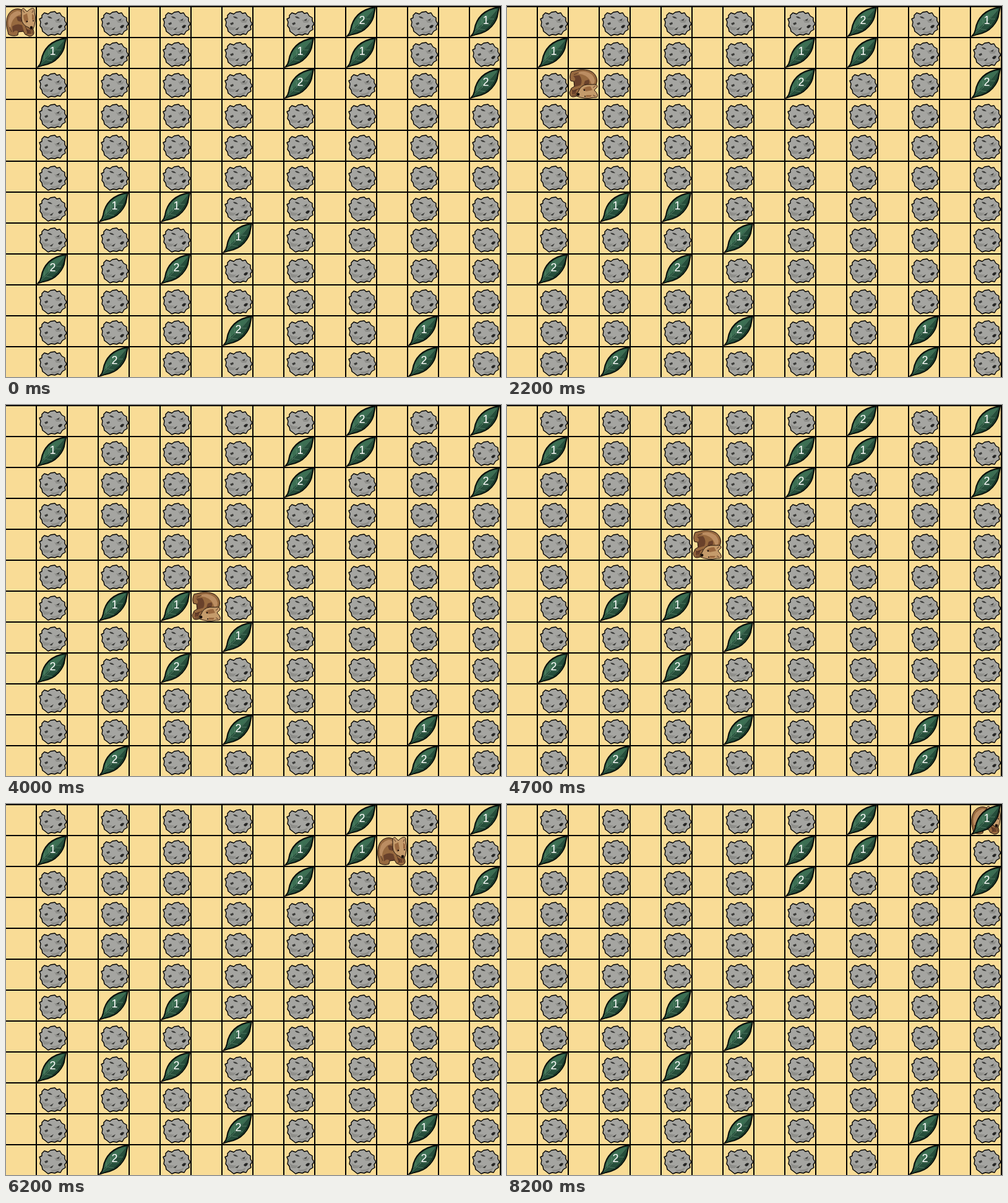
An HTML page with a canvas for the animation above (9500 ms loop, 800x600 px).

```html
<!DOCTYPE html>
<html lang="en">
<head>
<meta charset="utf-8">
<title>Wombat maze</title>
<style>
  html, body { margin: 0; width: 100%; height: 100%; overflow: hidden; background: #f9dc96; }
  canvas { display: block; }
</style>
</head>
<body>
<canvas id="stage" width="800" height="600"></canvas>
<script>
const CELL = 50, COLS = 16, ROWS = 12;
const LOOP = 9500, START = 1600, TICK = 100;
const ctx = document.getElementById('stage').getContext('2d');
ctx.lineJoin = 'round';

// Row of the "1" and "2" leaf in each wall column
const ONES = [1, 6, 6, 7, 1, 1, 10, 0];
const TWOS = [8, 11, 8, 10, 2, 0, 11, 2];

// Pace of the walk: [tick, acts done by then]
const PACE = [[0, 0], [7, 19], [16, 53], [25, 87], [39, 139], [40, 143], [50, 172], [56, 194], [67, 235]];

// Search each corridor from the top for the "1" leaf; the wombat only turns right.
function planWalk() {
  let x = 0, y = 0, dir = 0;
  const acts = [{ x, y, dir }];
  const save = () => acts.push({ x, y, dir });
  const turn = n => { while (n--) { dir = (dir + 1) % 4; save(); } };
  const move = () => {
    x += [1, 0, -1, 0][dir];
    y += [0, 1, 0, -1][dir];
    save();
  };
  ONES.forEach((row, i) => {
    if (i) {
      turn(3);
      while (y > 0) move();
      turn(1);
    }
    while (y < row) { turn(1); move(); turn(3); }
    move();
    if (i < ONES.length - 1) move();
  });
  return acts;
}
const acts = planWalk();

function actAt(tick) {
  const i = Math.max(1, PACE.findIndex(p => p[0] >= tick));
  const [t0, a0] = PACE[i - 1], [t1, a1] = PACE[i];
  return Math.floor(a0 + (a1 - a0) * (tick - t0) / (t1 - t0) + 1e-6);
}

const shape = d => new Path2D(d);
const ROCK = shape('M8 15L12 11 18 13 22 10 29 9 32 12 37 11 40 16 45 19 45 24 48 29 45 33 46 38 41 41 38 46 33 45 29 47 23 46 18 48 13 44 9 41 8 36 5 32 6 26 4 21 8 19Z');
const ROCK_SHADE = shape('M8 30Q14 36 22 34L18 39 11 39ZM28 22Q35 25 41 21L38 27 31 27ZM22 41Q31 43 38 37L35 44 25 45Z');
const ROCK_MARKS = shape('M17 17Q21 16 25 20Q20 21 17 17ZM31 23L37 20 35 24ZM12 28L17 26 18 29 14 31ZM20 38L27 34 24 39Z');
const ROCK_PIT = shape('M34 34Q37 29 41 31Q40 36 36 36Z');
const LEAF = shape('M47 2Q30 4 19 14Q9 24 7 38L5 44 1 49 10 46Q25 44 35 33Q44 23 45 12Z');
const LEAF_LIT = shape('M44 4Q29 7 19 17Q10 26 8 40Q16 33 25 24Q37 13 44 4Z');
const LEAF_RIM = shape('M46 4Q44 20 34 32Q24 43 8 46Q24 41 33 31Q42 20 46 4Z');
const VEINS = shape('M7 43Q22 31 43 6M13 38L12 29M20 32L19 21M28 24L28 14M15 37L25 39M23 30L33 30M31 21L39 21');
const BODY = shape('M1 33C0 20 3 8 15 5Q23 3 31 10L42 31 45 42Q46 48 38 49L31 46 28 41 20 42 19 47Q12 50 4 46Z');
const BACK = shape('M4 24Q6 11 18 8Q24 8 26 13Q16 15 11 23Q7 30 8 38Q3 33 4 24Z');
const SHADE = shape('M10 33Q18 27 26 31L29 41 20 42Q16 37 11 43ZM17 18Q22 15 25 19L25 26 19 24ZM32 37L40 39 41 45 35 45Z');
const HEAD = shape('M25 12Q24 3 29 4L34 9Q38 5 41 4Q47 2 46 10Q48 18 47 25Q46 33 44 37Q40 40 37 35Q26 31 25 21Z');
const MASK = shape('M28 15L34 12 36 22 33 28Q28 24 28 15ZM42 13L45 15 45 23 42 22Z');
const FACE_LINES = shape('M27 7L30 11M44 7L42 11M31 33L36 42L33 46M42 39L43 45M6 34L9 42');

function fill(path, color) {
  ctx.fillStyle = color;
  ctx.fill(path);
}
function line(path, color, width) {
  ctx.strokeStyle = color;
  ctx.lineWidth = width;
  ctx.stroke(path);
}
function dot(x, y, r) {
  ctx.beginPath();
  ctx.arc(x, y, r, 0, 7);
  ctx.fillStyle = '#1a0f0a';
  ctx.fill();
}
function inCell(x, y, draw) {
  ctx.save();
  ctx.translate(x * CELL, y * CELL);
  draw();
  ctx.restore();
}

function rock() {
  fill(ROCK, '#a5a5a1');
  fill(ROCK_SHADE, '#8f8f8b');
  fill(ROCK_MARKS, '#3c3c3a');
  fill(ROCK_PIT, '#252524');
  line(ROCK, '#000', 1.4);
}

function leaf(label) {
  fill(LEAF, '#264e3b');
  fill(LEAF_LIT, '#3c6f53');
  fill(LEAF_RIM, '#122a1f');
  line(VEINS, '#6b9079', 0.6);
  line(LEAF, '#040a07', 1.8);
  ctx.fillStyle = '#fff';
  ctx.font = '18px "Liberation Sans", Arial, sans-serif';
  ctx.textAlign = 'center';
  ctx.fillText(label, 25.5, 29);
}

function wombat(dir) {
  // The inside of a cell is centred slightly left of and below its middle.
  ctx.translate(24, 26);
  ctx.rotate(dir * Math.PI / 2);
  ctx.translate(-24, -26);
  fill(BODY, '#97693f');
  fill(BACK, '#bb8d62');
  fill(SHADE, '#69412b');
  line(BODY, '#20120b', 1);
  fill(HEAD, '#c59b6b');
  fill(MASK, '#99683f');
  line(HEAD, '#20120b', 1);
  line(FACE_LINES, '#4a2c1c', 0.9);
  dot(34, 25, 1.3);
  dot(44, 24, 1);
  dot(41, 35, 2.4);
}

function render(tick) {
  ctx.fillStyle = '#f9dc96';
  ctx.fillRect(0, 0, 800, 600);
  ctx.fillStyle = '#000';
  for (let x = 0; x < COLS; x++) ctx.fillRect(x * CELL + 48, 0, 2, 600);
  for (let y = 0; y < ROWS; y++) ctx.fillRect(0, y * CELL, 800, 2);

  const leaves = [];
  ONES.forEach((one, i) => {
    const x = 2 * i + 1;
    for (let y = 0; y < ROWS; y++) {
      const label = y === one ? '1' : y === TWOS[i] ? '2' : '';
      if (label) leaves.push([x, y, label]);
      else inCell(x, y, rock);
    }
  });

  const { x, y, dir } = acts[actAt(tick)];
  inCell(x, y, () => wombat(dir));
  leaves.forEach(([lx, ly, label]) => inCell(lx, ly, () => leaf(label)));
}

const t0 = performance.now();
const lastTick = PACE[PACE.length - 1][0];
let shown = -1;

function loop() {
  const t = (performance.now() - t0) % LOOP;
  const tick = t < START ? 0 : Math.min(lastTick, Math.floor((t - START) / TICK) + 1);
  if (tick !== shown) render(shown = tick);
  requestAnimationFrame(loop);
}
loop();
</script>
</body>
</html>
```
